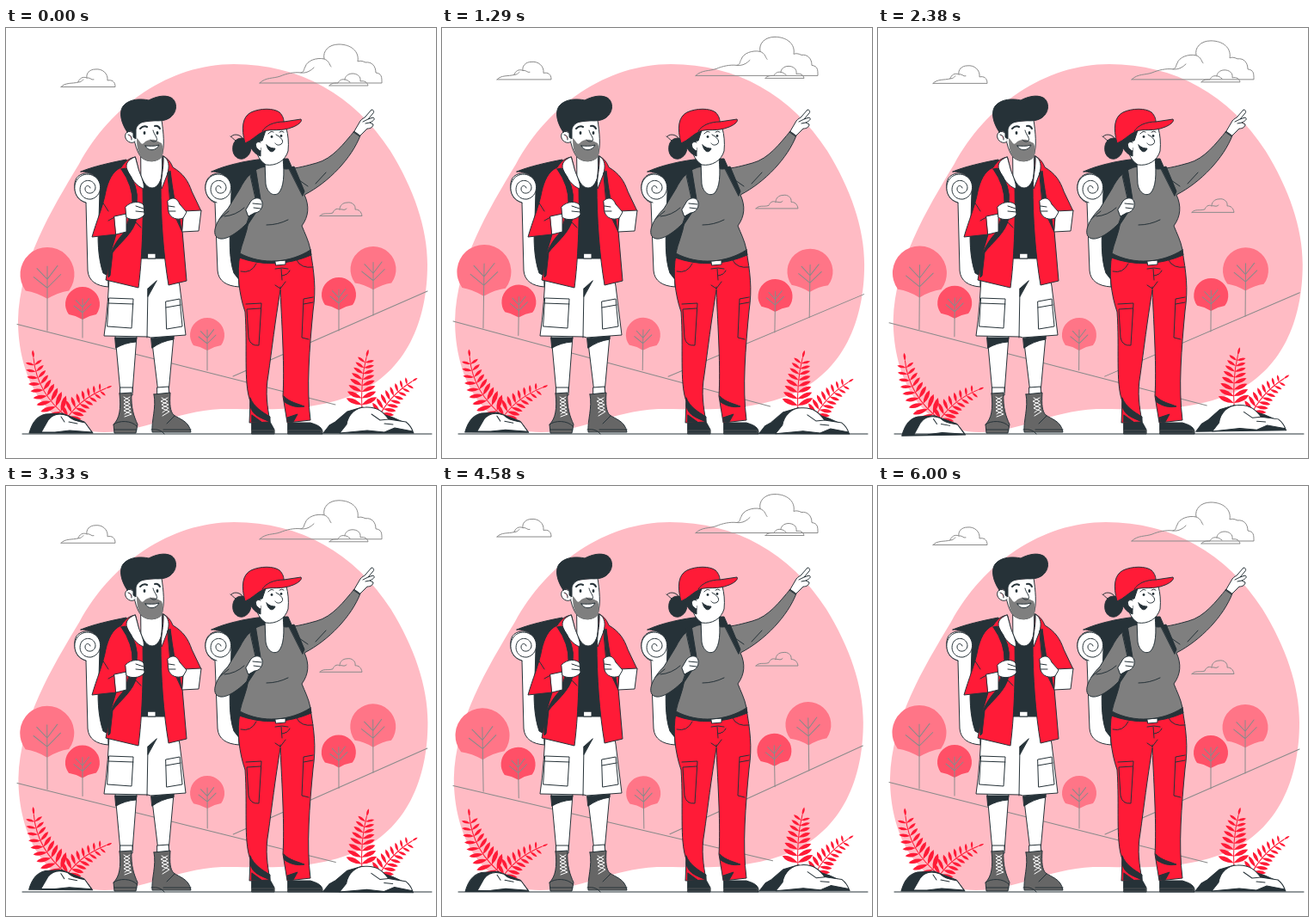
Write an HTML page that moves like this. It is 500x500 px and loops after 6.04 s.

```html
<!DOCTYPE html>
<html lang="en">
<head>
<meta charset="utf-8">
<title>Hikers</title>
<style>
html, body { margin: 0; width: 100%; height: 100%; overflow: hidden; background: #fff; }
svg { display: block; width: 100vw; height: 100vh; }
path, circle, ellipse { stroke: #263238; stroke-width: 1; stroke-linejoin: round; stroke-linecap: round; fill: none; }
.w { fill: #fff; }
.r { fill: #ff1b37; }
.g { fill: #7f7f7f; }
.b { fill: #666; }
.k { fill: #263238; }
.s { stroke: #8a8a8a; }
.flat { stroke: none; }
#blob { fill: #ffbbc4; }
</style>
</head>
<body>
<svg viewBox="0 0 500 500">
<path id="blob" class="flat" d="M265 42C342 42 405 78 447 143C474 187 490 232 490 275C490 340 466 400 405 426C350 449 290 442 250 443C195 446 160 470 114 470C45 470 14 405 14 340C16 272 52 213 85 158C122 90 190 42 265 42Z"/>

<g id="hills">
  <path class="s" d="M13 344.500L383 438M264 405L490 306"/>
</g>

<g id="clouds">
  <path class="s" d="M295 64H437C437 57 437 53 430 52C430 44 425 39 418 40C414 38 411 38 409 39C411 27 401 19 387 19C375 19 368 27 370 36C361 34 350 38 348 45C346 48 347 51 343 52C335 51 326 53 319 56C311 59 302 57 295 64M343 52C350 53 355 49 358 46M370 36C376 38 376 43 378 45"/>
  <path class="s" d="M376 67H421C420 63 417 61 412 62C413 56 408 53 403 53C397 53 394 57 394 60C389 59 387 62 386 64C382 64 378 64 376 67M394 60C397 60 398 62 400 63"/>
  <path class="s" d="M64 68.500H127C127 62 123 60 118 61C119 53 112 47 104 48C97 48 93 53 94 58C89 56 85 59 84 63C77 65 69 63 64 68.500M94 58C98 57 99 61 102 60M84 63C88 63 88 61 90 60"/>
  <path class="s" d="M365 218.500H414C413 213 410 211 406 211C407 206 402 202 397 203C391 203 388 207 388 211C384 209 381 212 380 215C374 217 369 214 365 218.500M388 211C391 210 393 213 396 210"/>
</g>

<g id="plants"></g>
<path d="M19 472H495"/>

<g id="man">
  <path class="w" d="M80 186C78 173 87 168 97 169L114 180L119 301C105 300 96 294 95 282L93 203C85 201 80 195 80 186Z"/>
  <path class="k" d="M87 167C101 161 124 156 140 153L150 200L122 290L113 285C107 268 106 245 108 222L109 190C110 174 101 167 87 167Z"/>
  <path class="w" d="M93 203C83 200 79 192 80 183C82 172 93 167 102 172C113 178 112 196 99 199C88 200 83 189 88 181C94 174 104 178 104 186C103 194 92 194 92 187C92 183 97 182 98 186"/>

  <path class="w" d="M127 358L133 424H147L152 358ZM169 358L177 424H189L195 358Z"/>
  <path class="k" d="M127 360H152L151 365Q138 366 128 372ZM169 361L195 358V362Q181 364 170 372Z"/>
  <path class="w" d="M133 418H147V427H133ZM176 418L189 417L190 427H176Z"/>
  <path class="b" d="M132 425L146 424C145 442 149 452 153 461L151 471H126L125 461C132 454 134 443 132 425Z"/>
  <path class="b" d="M172 426L191 424C190 438 191 446 195 450C202 455 213 457 215 470H170C169 456 175 442 172 426Z"/>
  <path d="M126 467H152M125 461C131 456 146 456 152 463M169 467C176 466 181 468 184 472M183 467H215M196 451L187 460"/>
  <path style="stroke:#fff" d="M137 429L144 433L137 437L145 441L137 445L146 449L138 452M144 429L137 433L144 437L137 441L145 445L138 449M188 430L180 434L189 438L181 442L190 446L182 451M181 430L188 434L181 438L189 442L182 447"/>

  <path class="w" d="M121 266H195L202 300L209 357L168 360L165 359L114 358Q119 325 121 266Z"/>
  <path class="k" d="M165 312V303L175 294Z"/>
  <path d="M165 303L164 360M120 314L148 315L146 349L118 347ZM119 320L148 321M186 318L202 315L205 347L187 350ZM186 325L203 322"/>
  <path class="k" d="M156 261H186V268H156Z"/>
  <path class="w" d="M165 262H174V268H165Z"/>

  <path class="k" d="M155 176H184L186 262H156Z"/>
  <path class="w" d="M157 142L181 145L182 166C181 178 176 186 170 186C164 186 160 180 157 172Z"/>
  <path class="r" d="M150 150C140 152 137 158 134 162C123 167 119 178 116 190C113 207 105 225 100 243L128 240L122 260L116 293L154 302C158 272 160 226 159 184Z"/>
  <path class="r" d="M183 149C189 152 192 157 194 162C206 169 212 178 216 190L227 213L206 214L205 236L210 294L189 299C183 263 180 222 180 183Z"/>
  <path class="w" d="M150 150C142 153 138 158 141 165C145 175 152 184 160 187C162 180 155 170 153 160ZM183 149C190 153 190 161 188 169L181 187C179 176 184 164 183 149Z"/>
  <path class="k" d="M134 164L139 163Q155 184 152 204L147 204Q148 184 134 164ZM188 168L191 166Q193 183 196 200L191 201ZM144 220L152 221C149 238 132 250 124 261L121 288L119 290C118 268 122 255 137 238ZM197 219L201 217L204 235Z"/>
  <path d="M112 202L119 213M128 219L119 224M209 213L200 205M150 225L157 232"/>
  <path class="w" d="M126 219L140 216L140 237L128 240ZM207 213L227 212L224 236L205 237Z"/>
  <path class="w" d="M139 208C145 201 157 201 160 206L161 217C156 224 144 224 140 220ZM188 201C193 196 199 197 202 205L210 214L206 221C199 224 191 221 189 214Z"/>
  <path d="M151 207L160 210M151 213L161 214M189 207L196 208M189 213L197 213"/>

  <path class="w" d="M147 111C147 125 151 143 157 150C164 157 177 156 181 149C185 137 183 121 181 107Z"/>
  <path class="g flat" d="M152 128C156 131 157 137 160 134C164 129 172 129 175 131L181 134C184 142 183 150 178 153C170 157 161 155 157 150C153 144 152 137 152 128Z"/>
  <path class="w" d="M162 137C167 137 172 138 178 136C175 143 165 144 162 137Z"/>
  <path class="w" d="M149 123C143 117 137 122 139 128C141 133 147 135 150 132M142 124Q147 125 146 130"/>
  <path class="k" d="M141 121C134 111 131 98 136 91C143 82 157 82 166 84C174 80 184 77 192 81C199 85 200 97 191 104C183 110 173 107 165 108C156 109 152 113 151 118L151 129L148 127L148 121Q144 118 141 121Z"/>
  <path d="M171 119C172 124 177 128 175 131C173 133 169 132 168 130"/>
  <path style="stroke-width:2" d="M156 117Q160 113 164 115M173 114Q177 113 179 117"/>
  <ellipse class="k flat" cx="161" cy="122" rx="1.400" ry="2"/>
  <ellipse class="k flat" cx="176" cy="122" rx="1.400" ry="2"/>
</g>

<g id="woman">
  <path class="w" d="M232 186C231 174 240 168 250 169L266 180L271 301C256 300 247 294 246 282L243 203C237 201 232 195 232 186Z"/>
  <path class="k" d="M239 167C254 160 279 154 302 152L328 152L335 168L300 240L272 294L265 285C259 268 260 245 261 222L262 190C262 174 253 167 239 167Z"/>
  <path class="w" d="M245 203C235 200 231 192 232 183C234 172 245 167 254 172C265 178 264 196 251 199C240 200 235 189 240 181C246 174 256 178 256 186C255 194 244 194 244 187C244 183 249 182 250 186"/>

  <path class="k" d="M286 458H307L312 467V472H286ZM328 459H354C360 461 367 463 368 469V472H328Z"/>
  <path class="w" d="M286 468H312V471H286ZM328 468H367V471H328Z" style="fill:#263238;stroke:#666;stroke-width:.6"/>
  <path class="r" d="M272 264C268 284 271 310 278 330C281 372 276 412 284 434L283 459L307 458C304 440 301 425 305 403C309 375 313 340 319 305C321 350 324 395 322 428L327 459L354 456C349 418 353 371 357 329C361 302 358 284 354 259Z"/>
  <path class="k" d="M284 430C288 441 299 447 307 452L307 458C296 453 287 451 284 440ZM286 450L297 458H286ZM323 428C329 435 340 437 347 440C338 442 330 439 324 435ZM327 453L339 449L334 458H328Z"/>
  <path d="M279 321L297 320L294 369Q284 370 282 360L280 327L296 326M357 313L346 315L344 360L352 362M346 321L357 319M273 283Q285 286 291 274M338 270Q343 280 357 278M319 305V301M313 280Q321 278 328 280M320 280L321 293M321 288Q328 287 330 282M313 299L319 303L325 295"/>
  <path class="k" d="M272 261Q313 274 354 257L355 264Q313 282 271 267Z"/>
  <path class="w" d="M313 271L325 270V275L314 276Z"/>

  <path class="g" d="M302 161C287 163 278 175 272 187L258 210C246 222 240 235 244 242C251 251 269 239 282 225C280 239 274 251 272 262C298 276 331 273 354 258C352 247 347 238 344 230C352 219 353 207 347 194C376 179 402 151 412 125L405 120C393 134 380 152 361 157C350 160 340 163 326 164Z"/>
  <path class="w" d="M301 148L322 151C324 171 323 185 317 192C310 197 303 190 302 181Z"/>
  <path class="k" d="M283 165L290 162L296 199L291 201ZM329 163L335 161L347 190L345 195ZM284 216L291 214L281 229L276 239Z"/>
  <path d="M254 219Q267 218 277 209M248 222L259 213M351 184L341 177M303 229Q316 229 328 223M360 181L372 168"/>
  <path class="w" d="M279 211L285 201C290 196 297 197 298 203C299 210 294 215 289 215L282 219Z"/>
  <path d="M287 204L297 205M288 209L296 210"/>
  <path class="w" d="M405 120L412 108C414 105 417 105 418 103L425 95C428 95 428 98 427 99L421 106L427 104C430 106 427 108 423 110L427 112C427 115 424 117 420 117L412 125Z"/>
  <path d="M415 109L421 106M418 111L423 110M404 121L411 126"/>

  <path class="k" d="M281 131C276 126 266 127 264 137C262 149 271 155 278 151C283 148 285 144 285 137Z"/>
  <path d="M277 131C274 124 266 122 262 126M267 131C264 129 263 127 261 126"/>
  <path class="w" d="M287 127C290 144 293 153 302 159C314 161 325 154 328 143C329 133 328 124 326 117L300 119Z"/>
  <path class="k" d="M281 129L302 119L298 131C294 131 292 136 296 139L296 149C288 146 284 140 281 129Z"/>
  <path class="w" d="M296 133C289 130 288 140 296 143"/>
  <path class="k" d="M303 136C307 140 311 140 313 140C311 146 305 145 303 136Z"/>
  <path d="M314 124C320 127 324 132 320 135C317 137 314 136 313 134M305 123Q308 119 311 121M318 121Q321 119 323 121"/>
  <circle class="k flat" cx="309" cy="126.500" r="1.400"/>
  <circle class="k flat" cx="320" cy="125.500" r="1.400"/>
  <path class="r" d="M278 134C273 116 275 103 285 98C296 93 311 93 318 98C322 102 323 106 323 109L343 106C345 109 339 113 334 115C320 121 308 117 300 120C291 124 286 131 278 134Z"/>
  <path d="M298 120C302 113 312 109 323 109"/>
</g>
</svg>

<script>
const $ = id => document.getElementById(id);
const path = (d, cls, style = '') => `<path class="${cls}" style="${style}" d="${d}"/>`;

// Round crown tapering in to the trunk, plus paired branches
function tree(x, y, r, base, color) {
  const a = r * .8, b = r * .6;
  let twigs = `M${x} ${base}V${y - r * .3}`;
  for (const [up, w] of [[.5, .5], [.18, .38]]) {
    const j = y + r * up, e = j - r * .4;
    twigs += `M${x - r * w} ${e}L${x} ${j}L${x + r * w} ${e - r * .1}`;
  }
  return path(`M${x - a} ${y + b}A${r} ${r} 0 1 1 ${x + a} ${y + b}Q${x + r * .4} ${y + r * .66} ${x} ${y + r * .9}Q${x - r * .4} ${y + r * .66} ${x - a} ${y + b}Z`, 'flat', 'fill:' + color)
    + path(twigs, 's');
}

// Leaf pairs along a quadratic stem
function fern(x0, y0, cx, cy, x1, y1, n, len) {
  let leaves = '';
  for (let i = 0; i <= n; i++) {
    const t = .12 + .88 * i / n, u = 1 - t;
    const x = u * u * x0 + 2 * u * t * cx + t * t * x1;
    const y = u * u * y0 + 2 * u * t * cy + t * t * y1;
    const dir = Math.atan2(u * (cy - y0) + t * (y1 - cy), u * (cx - x0) + t * (x1 - cx)) * 180 / Math.PI;
    const l = len * (1 - .55 * t);
    for (const side of i < n ? [-65, 65] : [0])
      leaves += `<path class="r flat" transform="translate(${x} ${y}) rotate(${dir + side})" d="M0 0Q${l * .6} ${-l * .28} ${l} 0Q${l * .6} ${l * .28} 0 0Z"/>`;
  }
  return path(`M${x0} ${y0}Q${cx} ${cy} ${x1} ${y1}`, '', 'stroke:#ff1b37') + leaves;
}

const pale = '#ff7587', deep = '#ff5067';
$('hills').innerHTML += tree(48, 286.5, 31.5, 352, pale) + tree(89, 321, 20, 360, deep)
  + tree(234, 357, 20, 398, pale) + tree(387, 310, 20, 352, deep) + tree(427, 280.5, 26.5, 334, pale);

$('plants').innerHTML = fern(72, 453, 36, 425, 32, 384, 9, 21) + fern(68, 458, 84, 432, 116, 419, 8, 17)
  + fern(414, 447, 412, 410, 419, 383, 8, 21) + fern(432, 455, 445, 428, 472, 411, 8, 17)
  + path('M27 471C30 460 36 451 46 449L65 448L91 458L101 471Z', 'k')
  + path('M41 470L49 456C55 448 64 448 72 451C78 457 84 457 92 459L100 470L74 468L57 470Z', 'w')
  + path('M73 458L83 460M64 452L68 458', '')
  + path('M369 471L376 462L383 458L397 446L414 441L450 453L468 461L474 471Z', 'k')
  + path('M388 471L396 461C398 449 407 441 418 441C432 440 439 447 445 455L465 458C470 462 472 466 473 469L452 465L440 470L420 468Z', 'w')
  + path('M425 449L435 456L445 455M440 460L450 461', '');

// Linear interpolation over [time, value] stops
function keys(t, stops) {
  const i = stops.findIndex(s => s[0] >= t);
  if (i < 1) return stops[0][1];
  const [a, p] = stops[i - 1], [b, q] = stops[i];
  return p + (q - p) * (t - a) / (b - a);
}
const wind = [[0, 0], [.25, 1], [.75, -1], [1, 0]];
const float = [[0, 0], [.5, -10], [1, 0]];
const shake = [0, -1, 2, -4, 4, -4, 4, -4, 2, -1, 0].map((v, i) => [i / 10, v]);

const set = (id, value) => $(id).setAttribute('transform', value);
function draw(now) {
  const t = now % 6040;
  const slow = t % 6000 / 6000, fast = t % 3000 / 3000;
  set('blob', `translate(${keys(slow, shake)} 0)`);
  set('hills', `rotate(${keys(slow, wind)} 251 346)`);
  set('clouds', `translate(0 ${keys(fast, float)})`);
  set('plants', `rotate(${keys(fast, wind)} 248 423)`);
}
const start = performance.now();
function tick() {
  draw(performance.now() - start);
  requestAnimationFrame(tick);
}
tick();
</script>
</body>
</html>
```
